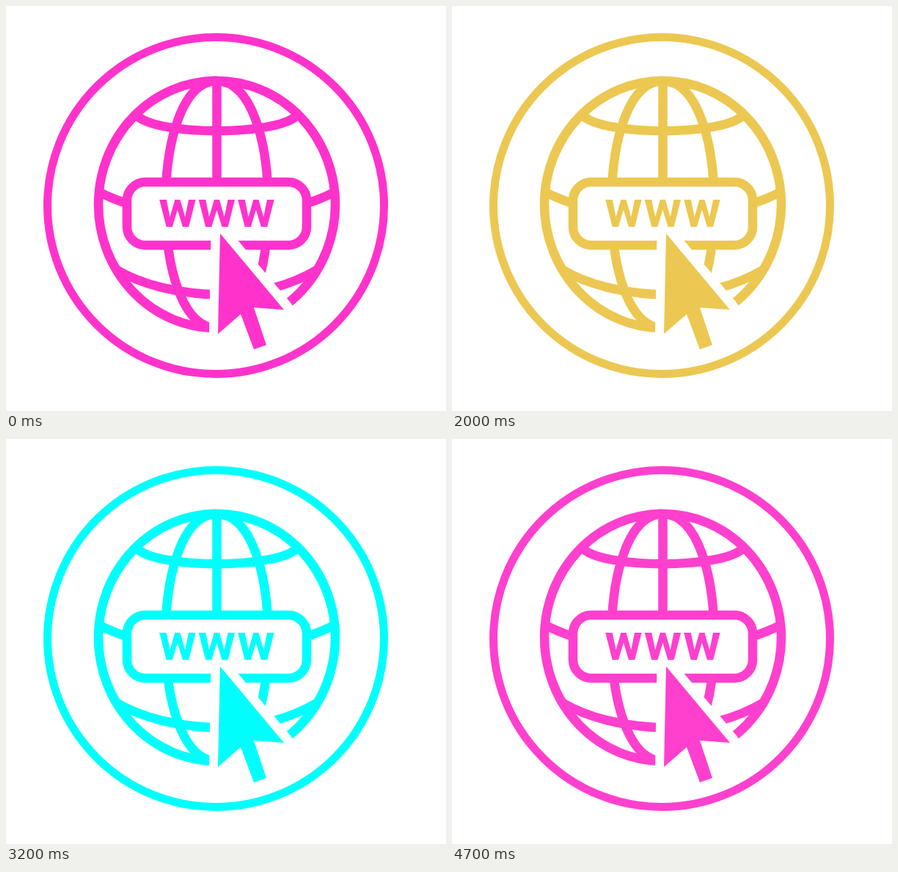
Recreate the animation shown at these times as an HTML page. Size 600x552 px, loop 4800 ms.

```html
<!DOCTYPE html>
<html lang="en">
<head>
<meta charset="utf-8">
<title>Web globe</title>
<style>
  html, body { margin: 0; width: 100%; height: 100%; overflow: hidden; background: #fff; }
  svg { display: block; width: 600px; height: 552px; }
  .line { fill: none; stroke: currentColor; stroke-width: 12.5; }
  .gap { fill: #fff; stroke: #fff; stroke-width: 25; stroke-linejoin: round; }
  text { font: bold 70px Roboto, sans-serif; letter-spacing: 2px; text-anchor: middle; }
</style>
</head>
<body>
<svg id="icon" viewBox="0 0 600 552" fill="currentColor">
  <circle class="line" cx="286" cy="272" r="229.5" style="stroke-width:11"/>

  <g class="line">
    <ellipse cx="287.5" cy="270.5" rx="161.5" ry="168.5"/>
    <path d="M287.5 102C240 103 217.5 185 217.5 270.5S240 438 287.5 439S357.5 356 357.5 270.5S335 103 287.5 102V240"/>
    <path d="M179 150C210 177 365 177 396 150"/>
    <path d="M126 253Q145 263 165 269M449 253Q430 263 410 269"/>
    <path d="M150 359C185 380 235 392 287.5 393.5S390 380 425 359"/>
    <rect x="165" y="240" width="245" height="86" rx="25" fill="#fff"/>
  </g>

  <path class="gap" d="M292 310L289.5 447L355 462L379 413Z"/>
  <path d="M292 310L289 447L320 420L338 468L355 462L338 411L379 414Z"/>
  <text x="288.5" y="301">www</text>
</svg>
<script>
  const LOOP = 4800, STEP = 100, LEG = LOOP / 3;
  // green and blue of pink, yellow and cyan
  const stops = [[51, 204], [182, 25], [255, 252]];
  const icon = document.getElementById("icon");

  function colorAt(time) {
    const leg = Math.floor(time / LEG), part = time / LEG - leg;
    const from = stops[leg], to = stops[(leg + 1) % 3];
    const [green, blue] = from.map((v, i) => v + (to[i] - v) * part);
    // red only drops out around cyan
    const red = Math.min(255, 273 * Math.sqrt(Math.abs(time / LEG - 2)));
    return `rgb(${[red, green, blue].map(Math.round)})`;
  }

  function draw() {
    const time = performance.now() % LOOP;
    icon.style.color = colorAt(Math.floor(time / STEP) * STEP);
    requestAnimationFrame(draw);
  }
  draw();
</script>
</body>
</html>
```
